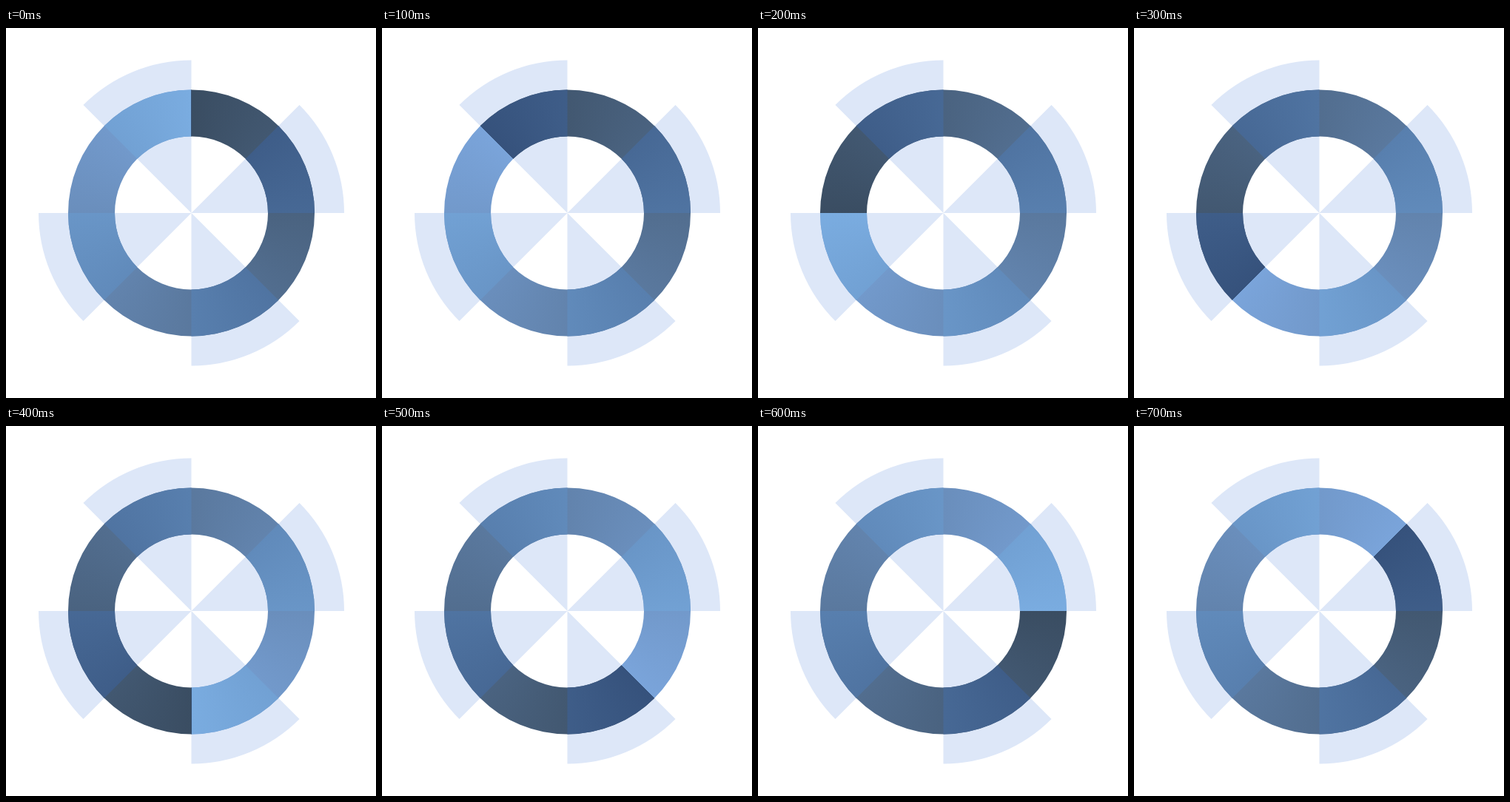
An HTML page with a canvas for the animation above (0.8 s loop, 500 by 500 pixels).

```html
<!DOCTYPE html>
<html lang="en">
<head>
<meta charset="utf-8">
<title>Spinning ring</title>
<style>
  html, body { margin: 0; width: 100%; height: 100%; overflow: hidden; background: #fff; }
  canvas { display: block; width: 500px; height: 500px; }
</style>
</head>
<body>
<canvas id="stage" width="500" height="500"></canvas>
<script>
const ctx = document.getElementById('stage').getContext('2d');
const CX = 250.5, CY = 250;
const FAN_R = 206.5, OUTER_R = 166.5, INNER_R = 103.5;
const STEP_MS = 100, STEPS = 8;
const EIGHTH = Math.PI / 4;

// Angles run clockwise from the right; the blades cover every other eighth.
const BLADES = [1, 3, 5, 7];

function fan(radius) {
  const path = new Path2D();
  for (const i of BLADES) {
    path.moveTo(CX, CY);
    path.arc(CX, CY, radius, i * EIGHTH - EIGHTH * 2, (i + 1) * EIGHTH - EIGHTH * 2);
    path.closePath();
  }
  return path;
}

function fanRing() {
  const path = new Path2D();
  for (const i of BLADES) {
    const from = (i - 2) * EIGHTH, to = (i - 1) * EIGHTH;
    path.moveTo(CX + OUTER_R * Math.cos(from), CY + OUTER_R * Math.sin(from));
    path.arc(CX, CY, OUTER_R, from, to);
    path.arc(CX, CY, INNER_R, to, from, true);
    path.closePath();
  }
  return path;
}

const blades = fan(FAN_R);
const bladeRing = fanRing();
const ring = new Path2D();
ring.arc(CX, CY, OUTER_R, 0, Math.PI * 2);
ring.closePath();
ring.moveTo(CX + INNER_R, CY);
ring.arc(CX, CY, INNER_R, 0, Math.PI * 2, true);
ring.closePath();

function sweep(angle, dark, light) {
  const g = ctx.createConicGradient(angle, CX, CY);
  g.addColorStop(0, dark);
  g.addColorStop(1, light);
  return g;
}

function draw(time) {
  const step = Math.floor(time / STEP_MS) % STEPS;
  const seam = -Math.PI / 2 - step * EIGHTH;
  ctx.fillStyle = '#fff';
  ctx.fillRect(0, 0, 500, 500);
  ctx.fillStyle = '#dde7f8';
  ctx.fill(blades);
  ctx.fillStyle = sweep(seam, 'rgb(58,77,98)', 'rgb(122,164,218)');
  ctx.fill(ring);
  ctx.fillStyle = sweep(seam, 'rgb(54,82,124)', 'rgb(122,172,224)');
  ctx.fill(bladeRing);
}

function tick() {
  draw(performance.now());
  requestAnimationFrame(tick);
}
tick();
</script>
</body>
</html>
```
